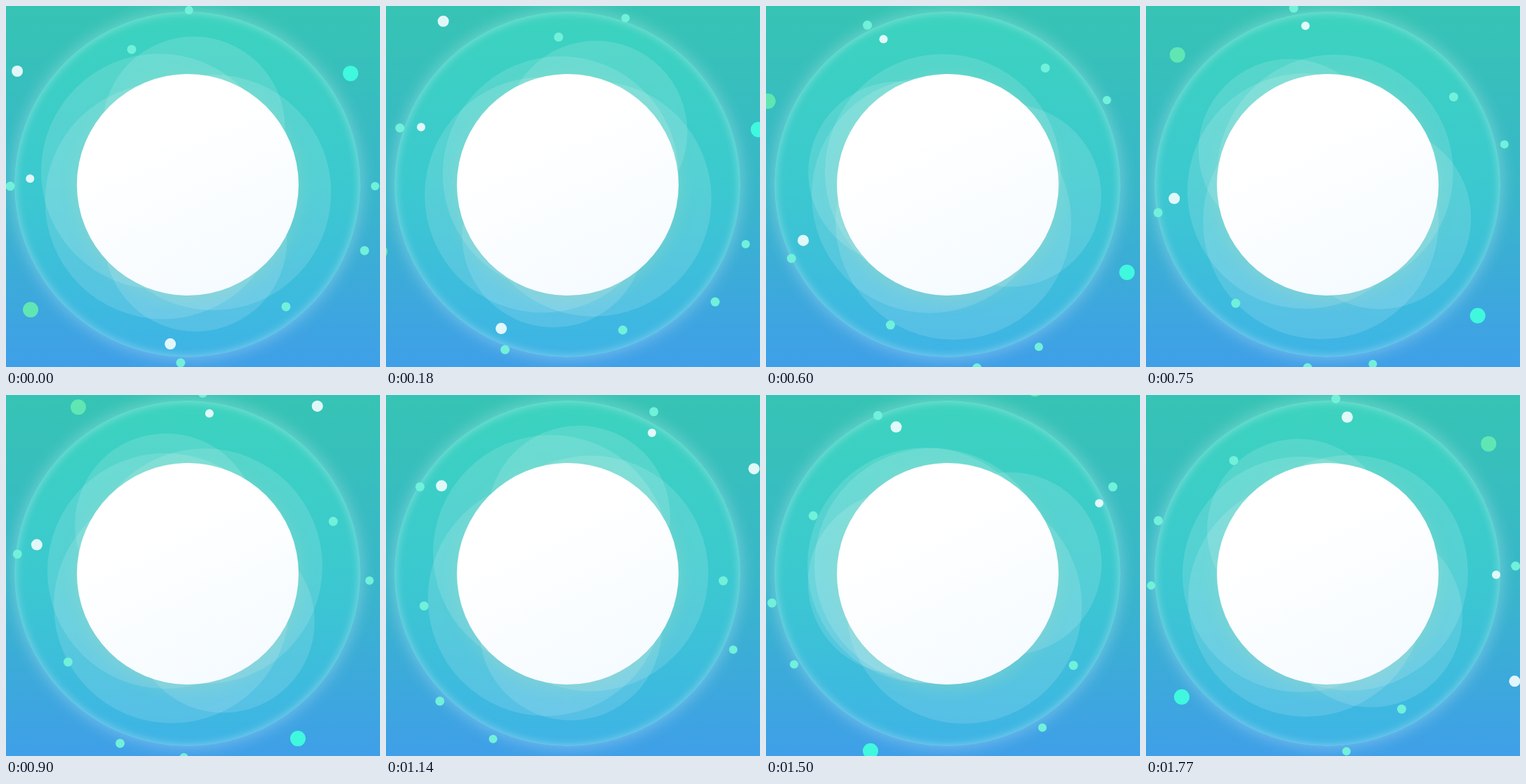
Recreate the animation shown at these times as an HTML page with a canvas. Size 533 by 515 pixels, loop 1.8 s.

```html
<!DOCTYPE html>
<html lang="en">
<head>
<meta charset="utf-8">
<title>Orbiting dots</title>
<style>
html, body { margin: 0; width: 100%; height: 100%; overflow: hidden; }
body { position: relative; background: linear-gradient(#36c4b4, #38b7c9 50%, #3f9fe8); }
.disc, .core { position: absolute; border-radius: 50%; }
.disc {
  left: 12px; top: 8px; width: 493px; height: 493px;
  background: linear-gradient(#3cd3be, #3bc9cf 50%, #3eb3e6);
  box-shadow: 0 0 24px rgba(255,255,255,.34), inset 0 0 14px rgba(255,255,255,.42);
}
.core {
  left: 100.8px; top: 96.8px; width: 316.6px; height: 316.6px;
  background: linear-gradient(155deg, #fff 30%, #f3faff);
  box-shadow: 0 6px 24px rgba(150,215,190,.45);
}
canvas { position: absolute; left: 0; top: 0; }
</style>
</head>
<body>
<div class="disc"></div>
<canvas width="533" height="515"></canvas>
<div class="core"></div>
<script>
const ctx = document.querySelector('canvas').getContext('2d');
const LOOP = 1800, STEP = 30, RAD = Math.PI / 180;
const MINT = '#71f0da', PALE = 'rgba(240,252,253,.92)';

// orbit radius, start angle, size, colour
const dots = [
  [232.5, 182.8, 6, PALE], [226.9, 98.2, 8, PALE], [299.6, 213.3, 8, PALE],
  [276.5, -35.7, 11, '#3ff8de'], [290.6, 142.8, 11, '#60e6b3'],
  [251.6, 268.7, 6, MINT], [259.5, -0.1, 6, MINT],
  [252.1, 94, 6.5, MINT], [260.5, 180.1, 6.5, MINT], [214.2, 245.9, 6.5, MINT],
  [261, 20.5, 6.5, MINT], [216.7, 52.3, 6.5, MINT]
];

// veil motion, keyed by time
const times = [0, 360, 600, 900, 1140, 1500, 1770];
const smallAngle = [269, 318.5, 371.9, 419.5, 454.3, 530.2, 589.8];
const largeAngle = [-10, 23.4, 78, 130, 150.9, 231.6, 329.3];
const loneX = [218, 269, 233, 227, 235, 227, 220];
const loneY = [236, 246, 270, 251, 225, 243, 256];

// smooth curve through the keyed values
function curve(v, t) {
  const last = times.length - 1;
  let i = 0;
  while (i < last - 1 && t >= times[i + 1]) i++;
  const slope = k => {
    const a = Math.max(k - 1, 0), b = Math.min(k + 1, last);
    return (v[b] - v[a]) / (times[b] - times[a]);
  };
  const h = times[i + 1] - times[i], s = (t - times[i]) / h, r = 1 - s;
  return r * r * ((1 + 2 * s) * v[i] + s * h * slope(i)) +
         s * s * ((3 - 2 * s) * v[i + 1] - r * h * slope(i + 1));
}

function circle(x, y, r, color) {
  ctx.fillStyle = color;
  ctx.beginPath();
  ctx.arc(x, y, r, 0, 2 * Math.PI);
  ctx.fill();
}

const veil = (x, y, r) => circle(x, y, r, 'rgba(255,255,255,.135)');

function polar(cx, cy, r, deg) {
  return [cx + r * Math.cos(deg * RAD), cy + r * Math.sin(deg * RAD)];
}

function draw(now) {
  const t = Math.floor(now % LOOP / STEP) * STEP;
  const turn = 0.1033 * Math.min(t, 900) + 0.0965 * Math.max(t - 900, 0);
  ctx.clearRect(0, 0, 533, 515);
  veil(curve(loneX, t), curve(loneY, t), 168);
  for (const flip of [0, 180]) {
    veil(...polar(259.5, 272.3, 36.5, curve(largeAngle, t) + flip), 168);
    veil(...polar(269, 254, 80.5, curve(smallAngle, t) + flip), 130);
  }
  for (const [orbit, start, size, color] of dots)
    circle(...polar(266.5, 257.5, orbit, start + turn), size, color);
}

const begin = performance.now();
function tick() {
  draw(performance.now() - begin);
  requestAnimationFrame(tick);
}
tick();
</script>
</body>
</html>
```
